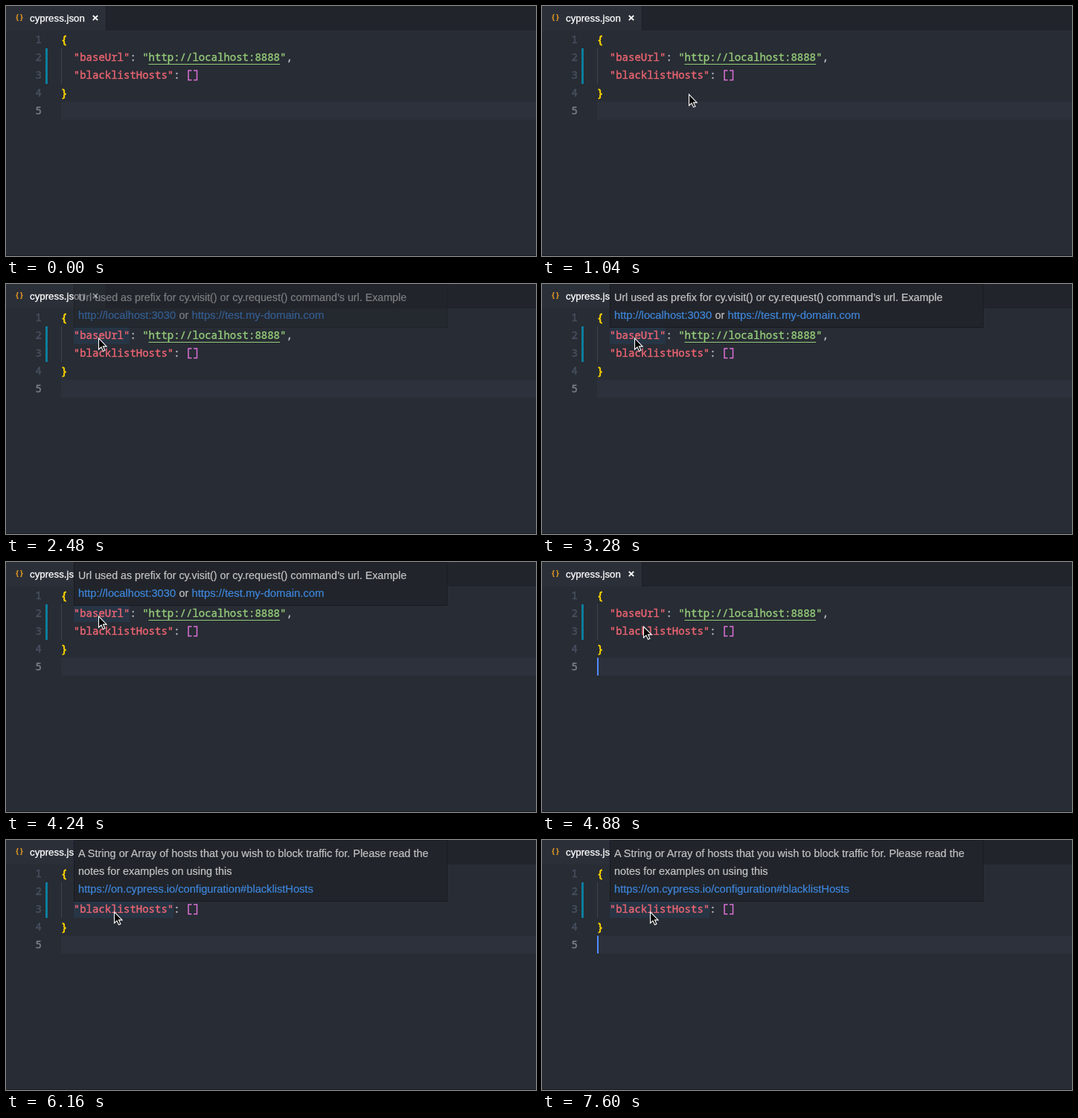
Recreate the animation shown at these times as an HTML page. Size 712x337 px, loop 8 s.

```html
<!DOCTYPE html>
<html lang="en">
<head>
<meta charset="utf-8">
<title>Editor hover hints</title>
<style>
  html, body { margin: 0; width: 100%; height: 100%; overflow: hidden; background: #282c34; }
  svg { display: block; width: 712px; height: 337px; }
  text { white-space: pre; }
  text, tspan { fill: currentColor; stroke: currentColor; }
  .code { font: 14px "Noto Sans Mono", monospace; color: #b4bac6; stroke-width: .4; }
  .ui { font-family: "Liberation Sans", Arial, sans-serif; color: #c4c4c4; stroke-width: .2; }
  .num { color: #495162; text-anchor: end; }
  .num.active { color: #7d838f; }
  .key { color: #ec6572; }
  .str { color: #94cb79; }
  .brace { color: #ffd700; stroke-width: .8; }
  .ui.link { color: #3f86dc; }
  .ui.tab { color: #fff; stroke-width: .3; }
  .icon { font: 600 10px "Noto Sans Mono", monospace; color: #f0a020; stroke: none; }
  .mark { fill: #273545; }
</style>
</head>
<body>
<svg viewBox="0 0 712 337">
  <rect width="712" height="337" fill="#282c34"/>
  <rect width="134" height="33" fill="#2b2f38"/>
  <rect x="134" width="578" height="33" fill="#21252b"/>
  <rect x="134" width="1" height="33" fill="#1b1e23"/>
  <rect y="336" width="712" height="1" fill="#1b1e23"/>
  <rect x="74" y="129" width="638" height="24" fill="#2c313c"/>

  <text class="icon" x="12" y="19">{}</text>
  <text class="ui tab" x="32" y="21" font-size="13.3">cypress.json</text>
  <path d="M116.8 12.8l6.4 6.4m0-6.4l-6.4 6.4" stroke="#fff" stroke-width="1.9"/>

  <rect x="53" y="57" width="3" height="48" fill="#0c7d9d"/>
  <path d="M74.5 57v48" stroke="#3e444e"/>
  <rect id="mark1" class="mark" x="91" y="57" width="75" height="24"/>
  <rect id="mark2" class="mark" x="91" y="81" width="134" height="24"/>

  <g id="numbers" class="code"></g>
  <g class="code">
    <text class="brace" x="74" y="49.5">{</text>
    <text x="90.8" y="74"><tspan class="key">"baseUrl"</tspan>: <tspan class="str">"http://localhost:8888"</tspan>,</text>
    <text x="90.8" y="98"><tspan class="key">"blacklistHosts"</tspan>:</text>
    <text class="brace" x="74" y="121.5">}</text>
  </g>
  <path d="M249.5 87H245V99.7H249.5M252 87H256.5V99.7H252" fill="none" stroke="#da70d6" stroke-width="1.5"/>
  <path d="M191.5 78.5H368" stroke="#94cb79"/>
  <rect id="caret" x="74" y="129" width="2" height="24" fill="#528bff"/>

  <g id="tip1"></g>
  <g id="tip2"></g>
  <path id="pointer" d="M0 0V15L3.5 11.8 6 17.2 8.4 16.2 6 10.9H10.6Z" fill="#000" stroke="#fff" stroke-width="1.1"/>
</svg>
<script>
const LOOP = 8000, STEP = 80, BLINK = 480;
const NS = "http://www.w3.org/2000/svg";
const $ = id => document.getElementById(id);

function add(parent, tag, attrs, text = "") {
  const el = document.createElementNS(NS, tag);
  for (const k in attrs) el.setAttribute(k, attrs[k]);
  el.textContent = text;
  parent.append(el);
}

for (let n = 1; n <= 5; n++)
  add($("numbers"), "text", { class: n === 5 ? "num active" : "num", x: 48, y: 26 + 24 * n }, n);

// Each run: x, line, font size, text, optional link flag
function buildTip(box, lines, runs) {
  add(box, "rect", { x: 91.5, y: 0.5, width: 501, height: 24 * lines + 10, fill: "#21252b", stroke: "#181a1f" });
  for (const [x, line, size, text, link] of runs)
    add(box, "text", { class: link ? "ui link" : "ui", x, y: 23 + 24 * line, "font-size": size }, text);
}

buildTip($("tip1"), 2, [
  [97, 0, 14.26, "Url used as prefix for cy.visit() or cy.request() command’s url. Example"],
  [97, 1, 14.65, "http://localhost:3030", true],
  [232.5, 1, 14.3, "or"],
  [249.5, 1, 14.82, "https://test.my-domain.com", true]
]);
buildTip($("tip2"), 3, [
  [97, 0, 14.46, "A String or Array of hosts that you wish to block traffic for. Please read the"],
  [97, 1, 14.4, "notes for examples on using this"],
  [97, 2, 14.65, "https://on.cypress.io/configuration#blacklistHosts", true]
]);

// Pointer route: time, x, y
const route = [
  [560, 437, 90], [640, 362, 132], [720, 305, 157], [880, 305, 157],
  [960, 262, 144], [1040, 197.5, 119.2], [1200, 160, 91], [1440, 130, 64],
  [1680, 122, 54], [2000, 122, 54], [2160, 124, 70], [2240, 124.5, 73.2],
  [4640, 124.5, 73.2], [4720, 126, 76], [4880, 136.5, 87],
  [5040, 143, 95], [5200, 145.5, 97]
];

function along(t) {
  const i = route.findIndex(p => p[0] > t);
  if (i < 0) return route[route.length - 1].slice(1);
  if (i === 0) return route[0].slice(1);
  const [a, b] = [route[i - 1], route[i]];
  const k = (t - a[0]) / (b[0] - a[0]);
  return [a[1] + (b[1] - a[1]) * k, a[2] + (b[2] - a[2]) * k];
}

const ramp = (t, from, to) => Math.min(1, Math.max(0, (t - from) / (to - from)));
const show = (id, on) => $(id).setAttribute("opacity", +on);

function draw(time) {
  const t = Math.floor(time % LOOP / STEP) * STEP;
  const tip1 = t < 4800 ? ramp(t, 2400, 2545) : 0;
  const tip2 = ramp(t, 5260, 5376);
  show("tip1", tip1);
  show("tip2", tip2);
  show("mark1", t >= 2400 && t < 4800);
  show("mark2", t >= 5280);
  show("caret", t >= 1840 && Math.floor((t - 1840) / BLINK) % 2 === 0);
  show("pointer", t >= 560);
  $("pointer").setAttribute("transform", `translate(${along(t)})`);
}

const start = performance.now();
function tick() {
  draw(performance.now() - start);
  requestAnimationFrame(tick);
}
tick();
</script>
</body>
</html>
```
